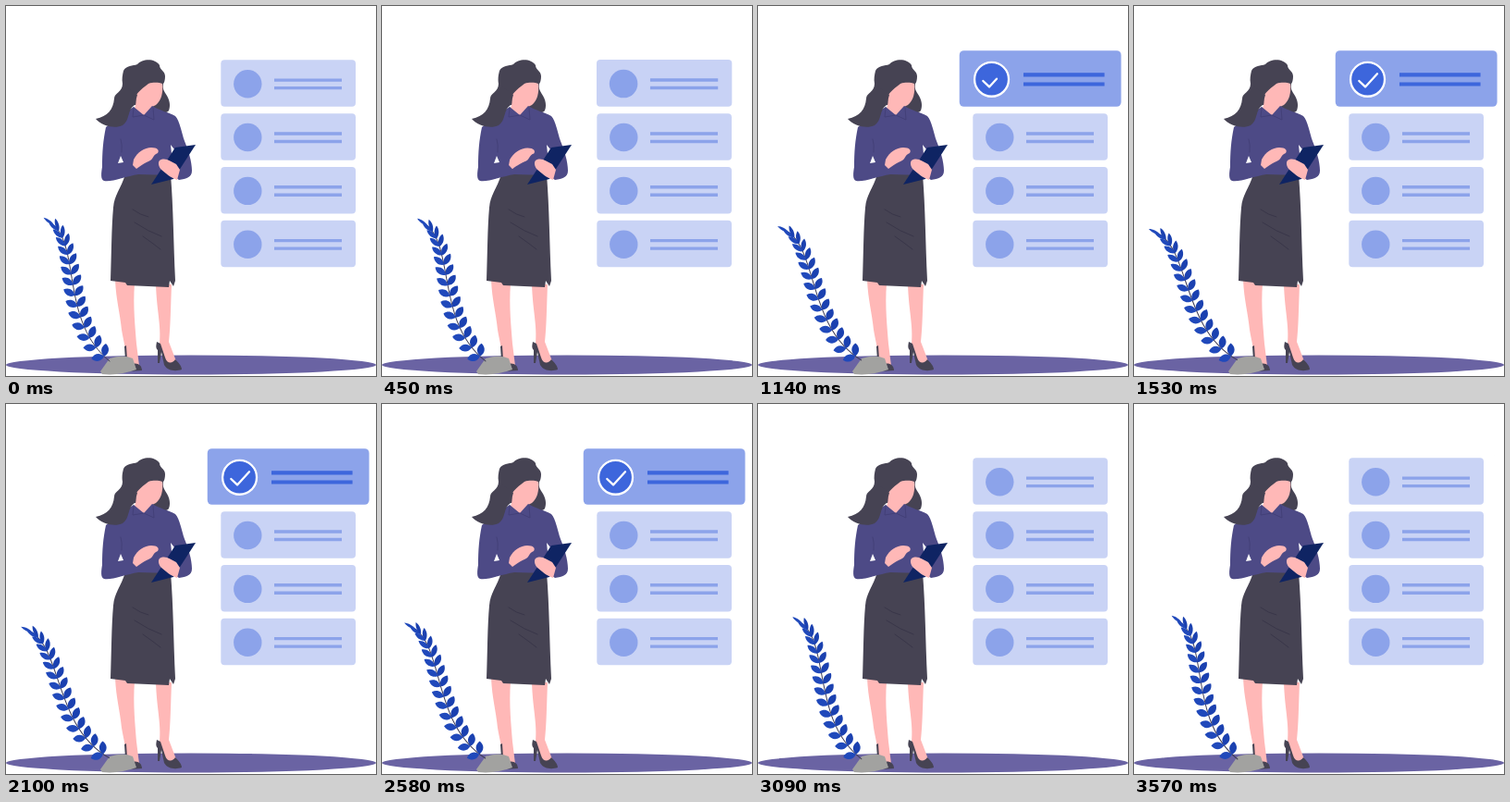
Write an HTML page that moves like this. It is 400x400 px and loops after 3600 ms.

```html
<!DOCTYPE html>
<html lang="en">
<head>
<meta charset="utf-8">
<title>Checklist</title>
<style>
  html, body { margin: 0; height: 100%; overflow: hidden; background: #fff; }
  svg { display: block; width: 100vw; height: 100vh; }
  .skin { fill: #ffb8b7; }
  .dark { fill: #464353; }
  .shirt { fill: #4d4a86; }
  .line { fill: none; stroke-linecap: round; stroke-linejoin: round; }
</style>
</head>
<body>
<svg viewBox="0 0 400 400">
  <ellipse cx="200" cy="388" rx="200" ry="10.5" fill="#6a63a3"/>
  <g id="cards"></g>

  <g id="woman">
    <path class="skin" d="M118 296L139 300C137 325 140 350 141 365L144 389L131 387C130 372 127 362 125 350C123 330 119 318 118 296Z"/>
    <path class="skin" d="M162 301H179C178 325 178 345 176 363L184 384L173 389L166 366C168 345 163 330 162 301Z"/>
    <path class="dark" d="M128 368L130 367L131 383L136 387C142 385 147 388 147 394L132 395L129 383Z"/>
    <path class="dark" d="M163 363C162 368 162 370 164 372V386H166L168 374L171 388C175 395 184 395 190 393C190 389 186 385 183 382C180 387 174 387 172 380L167 365Z"/>
    <path class="dark" d="M129 182H178C181 220 181 255 183 297L181 303L177 297L176 304L131 302L129 299L113 297C114 270 114 240 116 218C117 204 124 198 129 182Z"/>
    <path class="line" stroke="#393649" d="M137 220Q145 226 154 228M139 234Q154 244 168 249M148 249Q158 256 167 263"/>
    <path class="dark" d="M127 70C130 64 137 65 142 63C147 57 161 56 166 64C166 69 172 70 172 76C172 80 171 83 170 84C169 90 171 92 174 97C177 102 178 108 176 113C174 116 168 116 165 113L158 109L139 107L127 100L126 84C125 79 126 74 127 70Z"/>
    <path class="skin" d="M140 98C143 92 149 88 154 84C160 82 166 83 169 84C170 94 168 102 162 107L158 109C159 113 156 117 149 120L138 112C141 107 141 102 140 98Z"/>
    <path class="shirt" d="M138 109L149 118L158 108C166 113 176 115 183 119C188 124 190 138 193 146C197 156 201 168 201 178C201 185 195 187 187 188L180 183L143 182C130 184 113 191 106 189C102 188 103 180 104 174C104 158 105 145 108 131C118 124 128 116 138 109Z"/>
    <path class="dark" d="M97 122C110 119 116 112 117 100C117 94 126 93 126 84L142 96L139 107C131 112 134 124 126 129C118 133 104 130 97 122Z"/>
    <path class="line" stroke="#434078" d="M138 110L137 120L149 118L160 123L159 110M125 158Q126 150 124 144"/>
    <path fill="#fff" d="M121 170L124 162L127 169ZM178 150L182 155L179 160Z"/>
    <path fill="#0f2463" d="M183 153L205 150L181 187L157 193Z"/>
    <path class="skin" d="M166 167C172 163 178 168 184 171L188 177L185 188C178 186 172 180 168 177C165 174 164 169 166 167Z"/>
    <path id="hand" class="skin" d="M138 166C142 158 150 153 157 153C164 153 166 156 164 159C158 161 160 166 154 168C148 171 145 173 141 176L137 172Z"/>
  </g>

  <path fill="#a2a2a0" d="M102 395L112 381Q127 376 137 381L141 393Q122 400 104 398Z"/>
  <g id="plant"></g>
</svg>

<script>
const LOOP = 3600;
const $ = id => document.getElementById(id);
const clamp = v => Math.min(1, Math.max(0, v));
const ramp = (t, from, to) => clamp((t - from) / (to - from));
const smooth = v => v * v * (3 - 2 * v);
const sway = v => v < .5 ? .5 * (2 * v) ** 2.4 : 1 - .5 * (2 - 2 * v) ** 2.4;
const mix = (a, b, v) => `rgb(${a.map((c, i) => c + (b[i] - c) * v)})`;

const PALE = [201, 211, 245], SOFT = [140, 163, 234], STRONG = [61, 102, 220];

// Four list cards; the first one gets a tick.
$('cards').innerHTML = [0, 1, 2, 3].map(i => `
  <g class="card" transform="translate(0 ${i * 57.85})">
    <rect x="232.3" y="58.3" width="145.7" height="50.5" rx="4" fill="${mix(PALE, PALE, 0)}"/>
    <g class="marks" fill="${mix(SOFT, SOFT, 0)}">
      <circle cx="261.3" cy="84.2" r="15.2"/>
      <path d="M290 78.4h73v3.4h-73zM290 86.9h73v3.4h-73z"/>
    </g>
  </g>`).join('');

const card = document.querySelector('.card');
const panel = card.querySelector('rect');
const marks = card.querySelector('.marks');
card.insertAdjacentHTML('beforeend', `
  <g id="tick" class="line" stroke="#fff" stroke-width="1.9">
    <circle cx="261.3" cy="84.2" r="15.4"/>
    <path id="check" d="M253.6 85.6L259.2 91L270 79.2" pathLength="1" stroke-dasharray="1 2"/>
  </g>`);

// Leaves grow in pairs along a cubic stem.
const STEM = [[112, 384], [60, 342], [80, 264], [52, 237]];
const stemAt = (t, k) => {
  const [a, b, c, d] = STEM.map(p => p[k]), u = 1 - t;
  return u * u * u * a + 3 * u * u * t * b + 3 * u * t * t * c + t * t * t * d;
};
const leaf = (t, side) => {
  const x = stemAt(t, 0), y = stemAt(t, 1), e = .01;
  const heading = Math.atan2(stemAt(t + e, 1) - stemAt(t - e, 1), stemAt(t + e, 0) - stemAt(t - e, 0)) * 180 / Math.PI;
  const spread = 54 - 46 * t ** 3, w = 5.2 - 3.2 * t ** 3;
  return `<path transform="translate(${x} ${y}) rotate(${heading + side * spread})"
    d="M0 0C4 ${-w} 10 ${-w} 14 0C10 ${w} 4 ${w} 0 0" fill="${side < 0 ? '#2049bb' : '#1b41b0'}"/>`;
};
const PAIRS = 15;
let plant = `<path class="line" stroke="#3f3d56" d="M${STEM[0]}C${STEM.slice(1).join(' ')}"/>`;
for (let i = 0; i < PAIRS; i++) {
  const t = .04 + .96 * i / (PAIRS - 1);
  plant += leaf(t, -1) + (i < PAIRS - 1 ? leaf(t, 1) : '');
}
$('plant').innerHTML = plant;

function draw(now) {
  const t = now % LOOP;

  const half = t / (LOOP / 2);
  const lean = sway(half < 1 ? half : 2 - half);
  $('plant').setAttribute('transform', `rotate(${-9.6 * lean} 103 386)`);

  const tap = Math.sin(Math.PI * ramp(t, 400, 1100)) ** 2;
  $('hand').setAttribute('transform', `rotate(${16 * tap} 130 176)`);

  const grow = smooth(ramp(t, 400, 980)) * (1 - smooth(ramp(t, 2700, 3070)));
  card.setAttribute('transform', `translate(305.1 108.8) scale(${1 + .2 * grow}) translate(-305.1 -108.8)`);
  panel.setAttribute('fill', mix(PALE, SOFT, grow));
  marks.setAttribute('fill', mix(SOFT, STRONG, grow));

  const drawn = ramp(t, 1000, 1190);
  $('tick').setAttribute('opacity', ramp(t, 980, 1130) * (1 - ramp(t, 2700, 2880)));
  $('check').setAttribute('stroke-dashoffset', 1 - drawn);
  $('check').setAttribute('visibility', drawn > 0 ? 'visible' : 'hidden');

  requestAnimationFrame(() => draw(performance.now() - start));
}
const start = performance.now();
draw(0);
</script>
</body>
</html>
```
